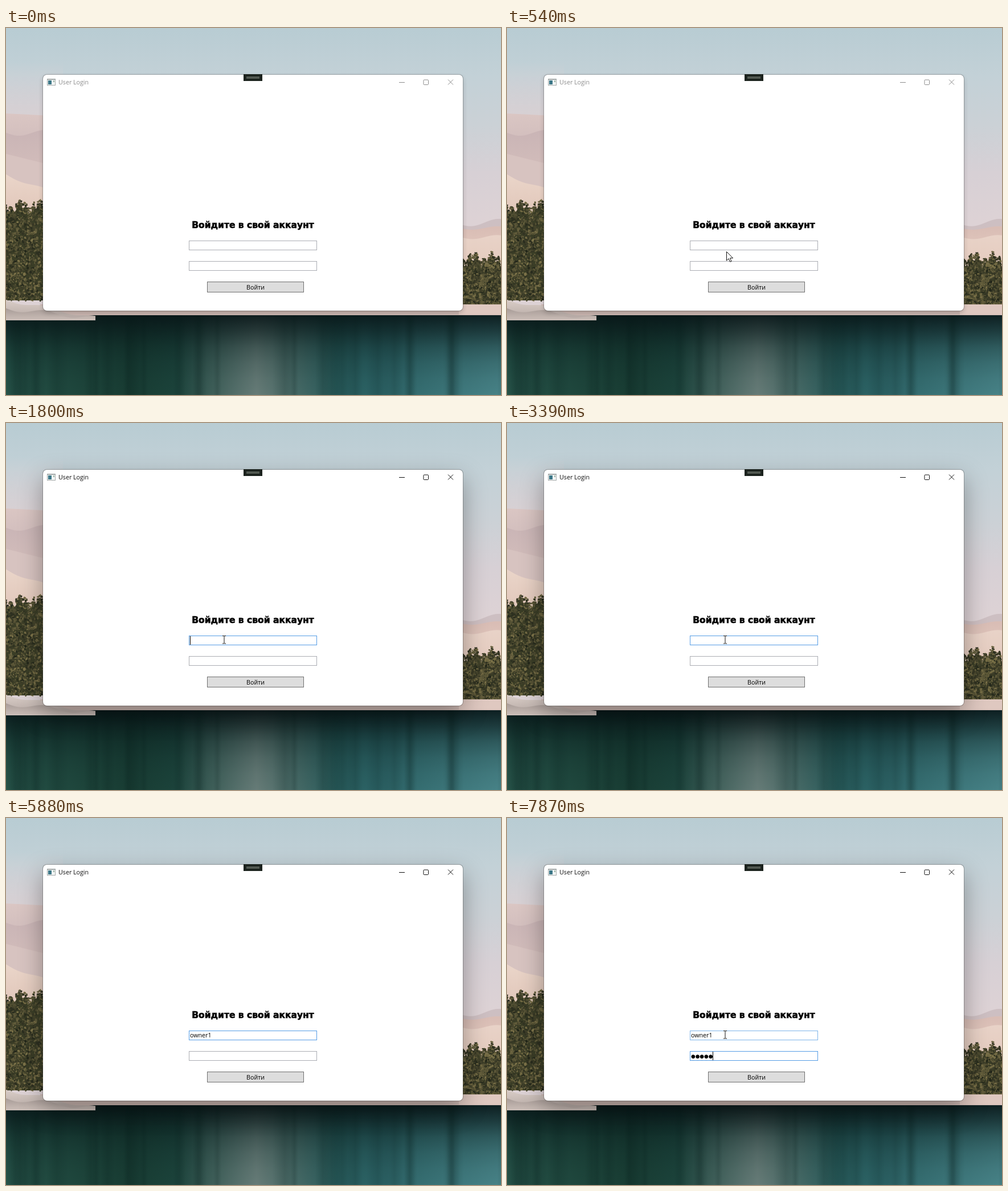
Write an HTML page with a canvas that moves like this. It is 869x644 px and loops after 8000 ms.

```html
<!DOCTYPE html>
<html lang="ru">
<head>
<meta charset="utf-8">
<title>User Login</title>
<style>
html, body { margin: 0; width: 869px; height: 644px; overflow: hidden; }
body { position: relative; font: 10.7px/15px "Open Sans", "Noto Sans", sans-serif; color: #000; }
body > *, #win > * { position: absolute; box-sizing: border-box; }
#win { left: 65px; top: 82px; width: 737px; height: 414px; border-radius: 7px; background: #fff; color: #8c8c8c;
  box-shadow: 0 0 0 1px rgba(60,60,60,.3), 0 4px 9px rgba(0,0,0,.2); }
#win.active { color: #101010; box-shadow: 0 0 0 1px rgba(60,60,60,.35), 0 15px 42px rgba(0,0,0,.34); }
#name { left: 27px; top: 6px; }
#win svg { left: 0; top: 0; overflow: visible; }
h1 { left: 0; width: 100%; top: 254px; margin: 0; text-align: center; color: #000;
  font: bold 15.5px/20px "DejaVu Sans", sans-serif; -webkit-text-stroke: .6px #000; }
.field { left: 256px; width: 225px; height: 17px; border: 1px solid #abadb3; background: #fff;
  padding-left: 1px; color: #000; white-space: pre; display: flex; align-items: center; }
.field.hover { border-color: #7eb4ea; }
.field.focus { border-color: #569de5; }
.field i { width: 1px; height: 15px; background: #000; visibility: hidden; }
#user { top: 291px; }
#pass { top: 327px; }
#pass span { font: 8.8px/15px "DejaVu Sans", sans-serif; padding-top: 1px; }
#go { left: 288px; top: 363px; width: 170px; height: 19px; border: 1px solid #707070; background: #ddd;
  color: #000; text-align: center; line-height: 18px; }
#go.hover { background: #bee6fd; border-color: #3c7fb1; }
#pointer { left: 0; top: 0; }
</style>
</head>
<body>
<canvas id="scene" width="869" height="644"></canvas>
<div id="win">
  <svg width="737" height="40" fill="none" stroke="currentColor">
    <g stroke="none">
      <path fill="#a3a9a9" d="M7 7h15v12H7z"/><path fill="#f4f6f5" d="M8 9h13v9H8z"/>
      <path fill="#3c7788" d="M9 10h6v7H9z"/><path fill="#9eb6a6" d="M18 10h2v3h-2z"/>
      <path fill="#1c231e" d="M352-1h33v12h-33z"/><path fill="#525952" d="M357 3h23v4h-23z"/>
    </g>
    <path d="M625 13.5h10M711 8.5l9 9m0-9l-9 9"/>
    <rect x="668" y="9" width="8.5" height="8.5" rx="1.2"/>
  </svg>
  <div id="name">User Login</div>
  <h1>Войдите в свой аккаунт</h1>
  <div id="user" class="field"><span></span><i></i></div>
  <div id="pass" class="field"><span></span><i></i></div>
  <div id="go">Войти</div>
</div>
<svg id="pointer" width="869" height="644">
  <circle id="click" cx="381" cy="379" r="11" fill="#fff78c" style="mix-blend-mode:multiply"/>
  <g id="mouse">
    <path id="arrow" d="M.5.5v15.6l3.6-3.4 2.4 5.6 2.5-1-2.4-5.5h5z" fill="#fff" stroke="#111"/>
    <path id="beam" d="M-3-6.5h2.5l.5.5.5-.5H3M-3 7h2.5L0 6.5l.5.5H3M0-6V6.5" fill="none" stroke="#111"/>
  </g>
</svg>
<script>
const W = 869, H = 644, SHORE = 504;
const $ = id => document.getElementById(id);
const c = $('scene').getContext('2d');
let seed = 11;
const rand = () => (seed = seed * 16807 % 2147483647) / 2147483647;

function gradient(x, y, x2, y2, ...colors) {
  const g = c.createLinearGradient(x, y, x2, y2);
  colors.forEach((k, i) => g.addColorStop(i / (colors.length - 1), k));
  return g;
}
function box(fill, x, y, w, h) {
  c.fillStyle = fill;
  c.fillRect(x, y, w, h);
}
// a wavy slope, filled down to its foot
function ridge(x, w, top, slope, wave, foot, ...colors) {
  const fill = gradient(0, top, 0, foot, ...colors);
  for (let i = 0; i < w; i++) {
    const y = top + slope * i + wave * Math.sin(i * .07);
    if (y < foot) box(fill, x + i, y, 1, foot - y);
  }
}
function trees(x0, w, top, foot) {
  const crown = x => top + 7 * Math.sin((x - x0) * .19) + 4 * Math.sin(x * .5);
  for (let x = x0; x < x0 + w; x++) box('#3a3d26', x, crown(x) + 9, 1, foot - crown(x) - 9);
  for (let i = 0; i < 1300; i++) {
    const x = x0 + rand() * w, y = crown(x) + rand() * (foot - crown(x)), light = rand();
    c.fillStyle = `rgb(${34 + 92 * light},${38 + 78 * light},${26 + 48 * light})`;
    c.beginPath();
    c.ellipse(x, y, 1 + rand() * 2.4, .8 + rand() * 1.4, rand() * 3, 0, 7);
    c.fill();
  }
}

function drawScene() {
  box(gradient(0, 0, 0, 340, '#b8ccd3', '#c3d1d7', '#cbd1d6', '#d7d0d5', '#ddd2d5'), 0, 0, W, SHORE);
  box(gradient(0, 60, 0, 160, 'rgba(218,208,212,0)', '#d8d0d3'), 0, 60, 100, 100);

  ridge(0, 70, 150, .05, 0, 300, '#dac6c3', '#c0acb0');
  ridge(0, 70, 184, 0, 5, 300, '#cab5b6', '#d9c3be');
  ridge(0, 70, 221, .25, 0, 310, '#d7c3c0', '#d7c3c0');
  ridge(0, 70, 257, .4, 3, 340, '#ead5c9', '#dfc4b7');
  trees(0, 72, 308, 478);

  ridge(795, 74, 344, -.06, 5, 420, '#cdbfc2', '#d9bdb5');
  ridge(795, 74, 351, 0, 3, 420, '#d9bdb5', '#e7cfc3');
  ridge(795, 74, 366, .02, 4, 430, '#e8d2c7', '#e4cabd');
  trees(796, 73, 402, 487);

  box('#cdb8b2', 60, 485, 809, SHORE - 485);
  box('#dfc8c0', 795, 485, 74, SHORE - 486);

  // water: tint across, darkness from the far shore, pale reflection, streaks
  box(gradient(0, 0, W, 0, '#28564b', '#193e34', '#23514b', '#2e676a', '#4b888d'), 0, SHORE, W, H - SHORE);
  box(gradient(300, 0, 580, 0, 'rgba(125,140,136,0)', 'rgba(125,140,136,.8)', 'rgba(125,140,136,0)'),
    300, SHORE, 280, H - SHORE);
  box(gradient(0, SHORE, 0, H, 'rgba(7,20,22,.9)', 'rgba(8,24,25,.68)', 'rgba(8,28,28,.42)',
    'rgba(8,30,30,.24)', 'rgba(8,30,30,.12)', 'rgba(8,30,30,.05)'), 0, SHORE, W, H - SHORE);
  for (let i = 0; i < 30; i++) {
    const x = rand() * W, w = 14 + rand() * 30;
    box(gradient(x, 0, x + w, 0, 'rgba(5,26,24,0)', 'rgba(5,26,24,.16)', 'rgba(5,26,24,0)'), x, SHORE, w, H - SHORE);
  }

  ridge(0, 157, 477, .2, 3, 512, '#d9cdc7', '#b5a8a3');
  ridge(0, 157, 492, .11, 4, 513, '#a89c97', '#cbbeb8');
}

const LOOP = 8000, LOGIN = 'owner1', BLINK = 530;
const FOCUS = 1800, TAB = 6140, CLICK = 1140;
const loginKeys = [4070, 4340, 4340, 4470, 4810, 5340];
const passKeys = [7070, 7200, 7400, 7530, 7870];
const resets = [FOCUS, ...loginKeys, TAB + 70, ...passKeys];
const pressed = (keys, t) => keys.filter(k => t >= k).length;
const show = (el, on) => el.style.visibility = on ? 'visible' : 'hidden';

function caretOn(t) {
  const n = pressed(resets, t);
  return n > 0 && Math.floor((t - resets[n - 1]) / BLINK) % 2 === 0;
}

function setField(id, text, hover, focus, caret) {
  const el = $(id);
  el.classList.toggle('hover', hover);
  el.classList.toggle('focus', focus);
  el.firstChild.textContent = text;
  show(el.lastChild, focus && caret);
}

function render(t) {
  // the pointer glides in, sampled about 16 times a second
  const step = Math.min(10, Math.max(0, Math.floor((t - 168) / 62)));
  const left = (1 - step / 10) ** 2.45;
  const x = Math.round(383 + 19 * left), y = Math.round(380 + 114 * left);
  const over = (top, height) => t >= 170 && y >= top && y < top + height;
  const onUser = over(373, 17), onPass = over(409, 17);
  const visible = t >= 170 && (t < loginKeys[0] || t >= TAB);

  $('win').classList.toggle('active', t >= CLICK);
  $('go').classList.toggle('hover', over(445, 19));
  $('mouse').setAttribute('transform', `translate(${x},${y})`);
  show($('arrow'), visible && !onUser && !onPass);
  show($('beam'), visible && (onUser || onPass));
  show($('click'), t >= CLICK && t < CLICK + 130);

  const caret = caretOn(t);
  setField('user', LOGIN.slice(0, pressed(loginKeys, t)), onUser, t >= FOCUS && t < TAB, caret);
  setField('pass', '●'.repeat(pressed(passKeys, t)), onPass, t >= TAB, caret);
}

drawScene();
const start = performance.now();
(function tick() {
  render((performance.now() - start) % LOOP);
  requestAnimationFrame(tick);
})();
</script>
</body>
</html>
```
